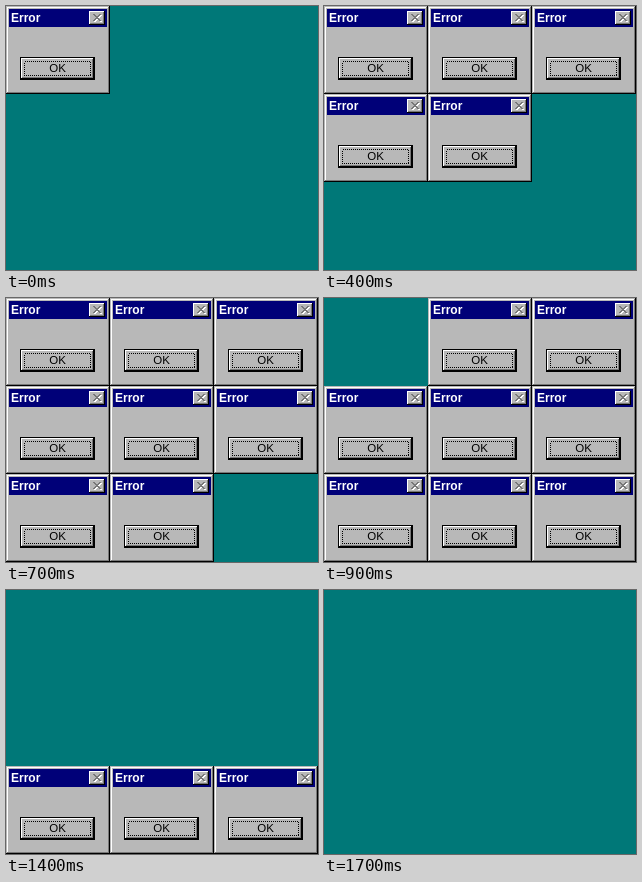
Write an HTML page that moves like this. It is 312 px wide and 264 px high and loops after 1800 ms.

```html
<!DOCTYPE html>
<html lang="en">
<head>
<meta charset="utf-8">
<title>Error dialogs</title>
<style>
html, body { margin: 0; width: 100%; height: 100%; overflow: hidden; background: #007878; }
svg { display: block; width: 312px; height: 264px; }
text { font-family: "Liberation Sans", Arial, sans-serif; }
</style>
</head>
<body>
<svg id="stage" viewBox="0 0 312 264" shape-rendering="crispEdges">
  <rect width="312" height="264" fill="#007878"/>
</svg>
<script>
const COLS = 3, COUNT = 9, W = 104, H = 88, STEP = 100, LOOP = 1800;
const FACE = '#b8b8b8', SHADE = '#787878', LIGHT = '#fff', DARK = '#000';

const rect = (x, y, w, h, fill) =>
  `<rect x="${x}" y="${y}" width="${w}" height="${h}" fill="${fill}"/>`;

// One-pixel bevel: top and left in one colour, bottom and right in another.
const bevel = (x, y, w, h, tl, br) =>
  rect(x, y, w, 1, tl) + rect(x, y, 1, h, tl) +
  rect(x, y + h - 1, w, 1, br) + rect(x + w - 1, y, 1, h, br);

// Pixel cross, two pixels wide per row.
function cross(x, y, fill) {
  let s = '';
  for (let i = 0; i < 7; i++) {
    s += rect(x + i, y + i, 2, 1, fill) + rect(x + 6 - i, y + i, 2, 1, fill);
  }
  return s;
}

function dotted(x, y, w, h) {
  return `<rect x="${x + 0.5}" y="${y + 0.5}" width="${w - 1}" height="${h - 1}"
    fill="none" stroke="${DARK}" stroke-dasharray="1 1"/>`;
}

const dialog =
  rect(0, 0, W, H, FACE) +
  bevel(0, 0, W, H, FACE, DARK) +
  bevel(1, 1, W - 2, H - 2, LIGHT, SHADE) +
  rect(3, 3, 98, 18, '#000078') +
  `<text x="5" y="16" font-size="12" font-weight="700" fill="${LIGHT}"
    textLength-adjust="none">Error</text>`.replace(/\s+textLength-adjust="none"/, '') +
  rect(83, 5, 16, 14, FACE) +
  bevel(83, 5, 16, 14, LIGHT, DARK) +
  bevel(84, 6, 14, 12, FACE, SHADE) +
  cross(88, 9, LIGHT) + cross(87, 8, SHADE) +
  bevel(14, 51, 75, 23, DARK, DARK) +
  bevel(15, 52, 73, 21, LIGHT, DARK) +
  bevel(16, 53, 71, 19, FACE, SHADE) +
  dotted(18, 55, 67, 15) +
  `<text x="51.5" y="66" font-size="11.5" text-anchor="middle" fill="${DARK}">OK</text>`;

const stage = document.getElementById('stage');
const dialogs = Array.from({ length: COUNT }, (_, i) => {
  const g = document.createElementNS('http://www.w3.org/2000/svg', 'g');
  g.setAttribute('transform', `translate(${i % COLS * W} ${Math.floor(i / COLS) * H})`);
  g.innerHTML = dialog;
  stage.append(g);
  return g;
});

// Dialogs open one per step, then close in the same order.
function draw(ms) {
  const step = Math.floor(ms % LOOP / STEP);
  dialogs.forEach((g, i) => {
    g.style.display = step >= i && step < i + COUNT ? '' : 'none';
  });
}

const start = performance.now();
function tick() {
  draw(performance.now() - start);
  requestAnimationFrame(tick);
}
tick();
</script>
</body>
</html>
```
